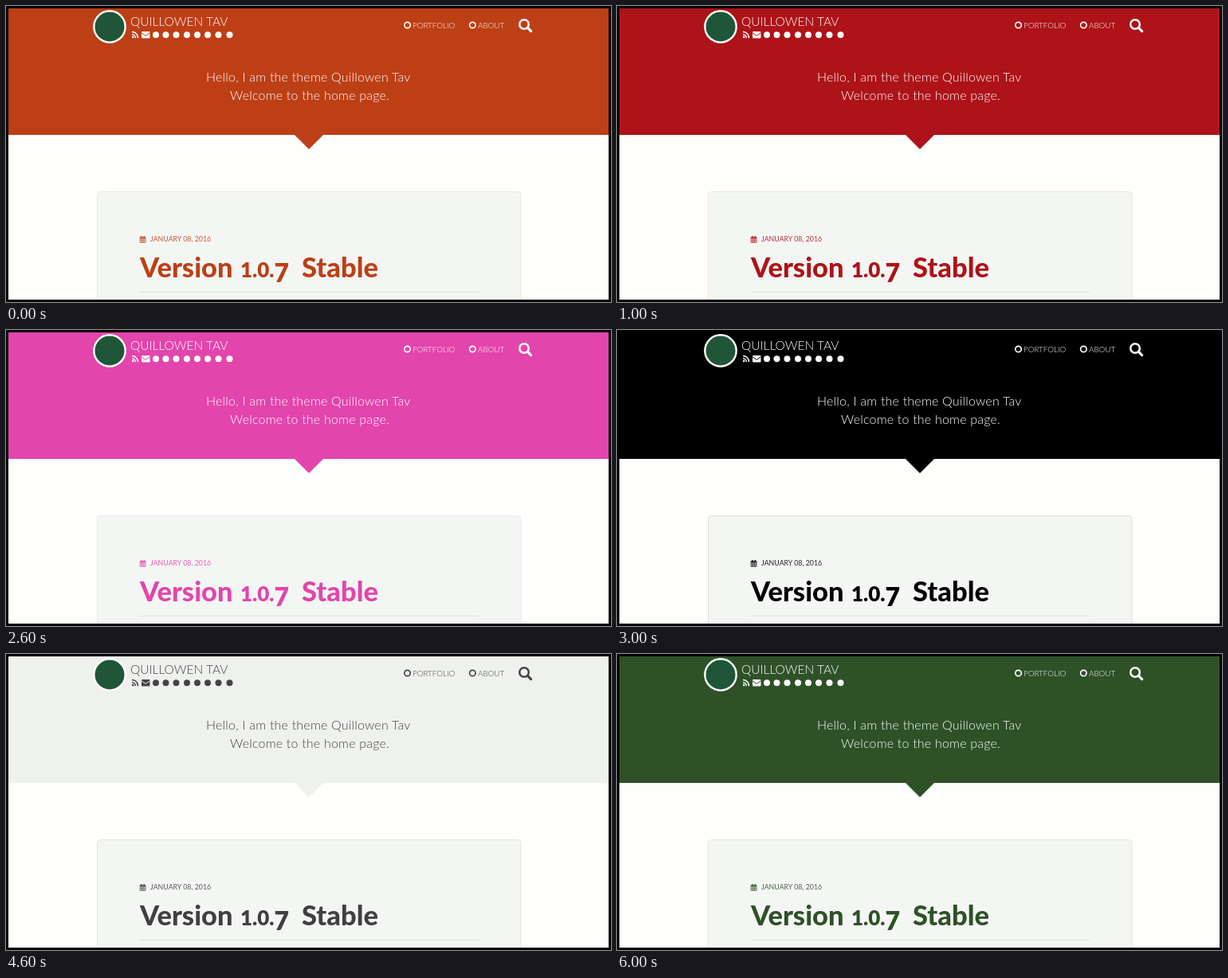
Recreate the animation shown at these times as an HTML page. Size 759 px wide and 372 px high, loop 7000 ms.

```html
<!DOCTYPE html>
<html lang="en">
<head>
<meta charset="utf-8">
<title>Theme colours</title>
<style>
  html, body { margin: 0; width: 100%; height: 100%; overflow: hidden; background: #000; }
  svg { display: block; width: 759px; height: 372px; font-family: Lato, "Open Sans", sans-serif; }
  .band { fill: var(--band); }
  .ink { fill: var(--ink); }
  .line { fill: none; stroke: var(--ink); }
  .accent { fill: var(--accent); }
  .light { font-weight: 300; }
  .intro { font-size: 16px; letter-spacing: .2px; }
  .nav { font-size: 9.8px; }
  .heading { font-size: 34.5px; font-weight: 800; }
  .digits { font-size: 26px; font-weight: 900; }
</style>
</head>
<body>
<svg id="page" viewBox="0 0 759 372">
  <rect width="759" height="372"/>
  <rect x="3" y="3" width="753" height="366" fill="#fefefc"/>
  <path class="band" d="M3 3H756V162H398L380 180L362 162H3Z"/>

  <circle cx="130" cy="26" r="19.7" fill="#1f5638" stroke="#fff" stroke-width="2.4"/>
  <g class="ink light">
    <text x="156" y="25" font-size="15.5">QUILLOWEN TAV</text>
    <g class="intro">
      <text x="251" y="95">Hello, I am the theme Quillowen Tav</text>
      <text x="281" y="118">Welcome to the home page.</text>
    </g>
    <g class="nav">
      <text x="510" y="27.5">PORTFOLIO</text>
      <text x="592" y="27.5">ABOUT</text>
    </g>
  </g>

  <!-- feed and mail -->
  <path class="line" stroke-width="1.5" d="M158 35.8A4.4 4.4 0 0 1 162.4 40.2M158 32.6A7.6 7.6 0 0 1 165.6 40.2"/>
  <circle class="ink" cx="159.2" cy="39.1" r="1.3"/>
  <rect class="ink" x="170" y="32" width="10.5" height="8.5" rx="1"/>
  <path fill="none" stroke="var(--band)" d="M170 33.8L175.2 37.4L180.5 33.8"/>
  <g class="ink" id="links"></g>

  <!-- menu rings and search -->
  <g class="line" stroke-width="1.7">
    <circle cx="503.5" cy="24" r="3.7"/>
    <circle cx="585.3" cy="24" r="3.7"/>
    <circle cx="650" cy="23" r="5.8" stroke-width="2.5"/>
    <path d="M654.4 27.4L658.6 31.6" stroke-width="3.2" stroke-linecap="round"/>
  </g>

  <path d="M114.5 369V237.5a4 4 0 0 1 4-4H642a4 4 0 0 1 4 4V369" fill="#f4f6f4"/>
  <path d="M114.5 369V237.5a4 4 0 0 1 4-4H642a4 4 0 0 1 4 4V369" fill="none" stroke="var(--accent)" stroke-opacity=".11"/>
  <g opacity=".85">
    <path class="accent" d="M167.7 290.3H175.4V297.4H167.7ZM169 289H170.6V291H169ZM172.5 289H174.1V291H172.5Z"/>
    <path d="M168.5 293.2H174.6M168.5 295.5H174.6" stroke="#f4f6f4" stroke-width="1.3" stroke-dasharray="1.5 .8"/>
    <text class="accent" x="181" y="296.3" font-size="8.8">JANUARY 08, 2016</text>
  </g>
  <g class="accent heading">
    <text x="168" y="341">Version</text>
    <text x="294" y="341" class="digits">1.0.<tspan dy="6" font-size="32">7</tspan></text>
    <text x="371" y="341">Stable</text>
  </g>
  <path d="M168 359.5H593" stroke="#dfe0df"/>
</svg>
<script>
  const page = document.getElementById("page");
  const themes = [
    { band: "#bd3f16" },
    { band: "#ad1318" },
    { band: "#e245ac" },
    { band: "#000000" },
    { band: "#eff1ee", ink: "#444444", accent: "#404040" },
    { band: "#3b4048" },
    { band: "#2e5127" }
  ];

  document.getElementById("links").innerHTML =
    [188, 200.5, 213.5, 227, 240, 253, 266.5, 280.5]
      .map(x => `<circle cx="${x}" cy="36.3" r="4"/>`).join("");

  function draw(now) {
    const { band, ink = "#ffffff", accent = band } = themes[Math.floor(now / 1000) % themes.length];
    page.style.setProperty("--band", band);
    page.style.setProperty("--ink", ink);
    page.style.setProperty("--accent", accent);
    requestAnimationFrame(draw);
  }
  draw(performance.now());
</script>
</body>
</html>
```
